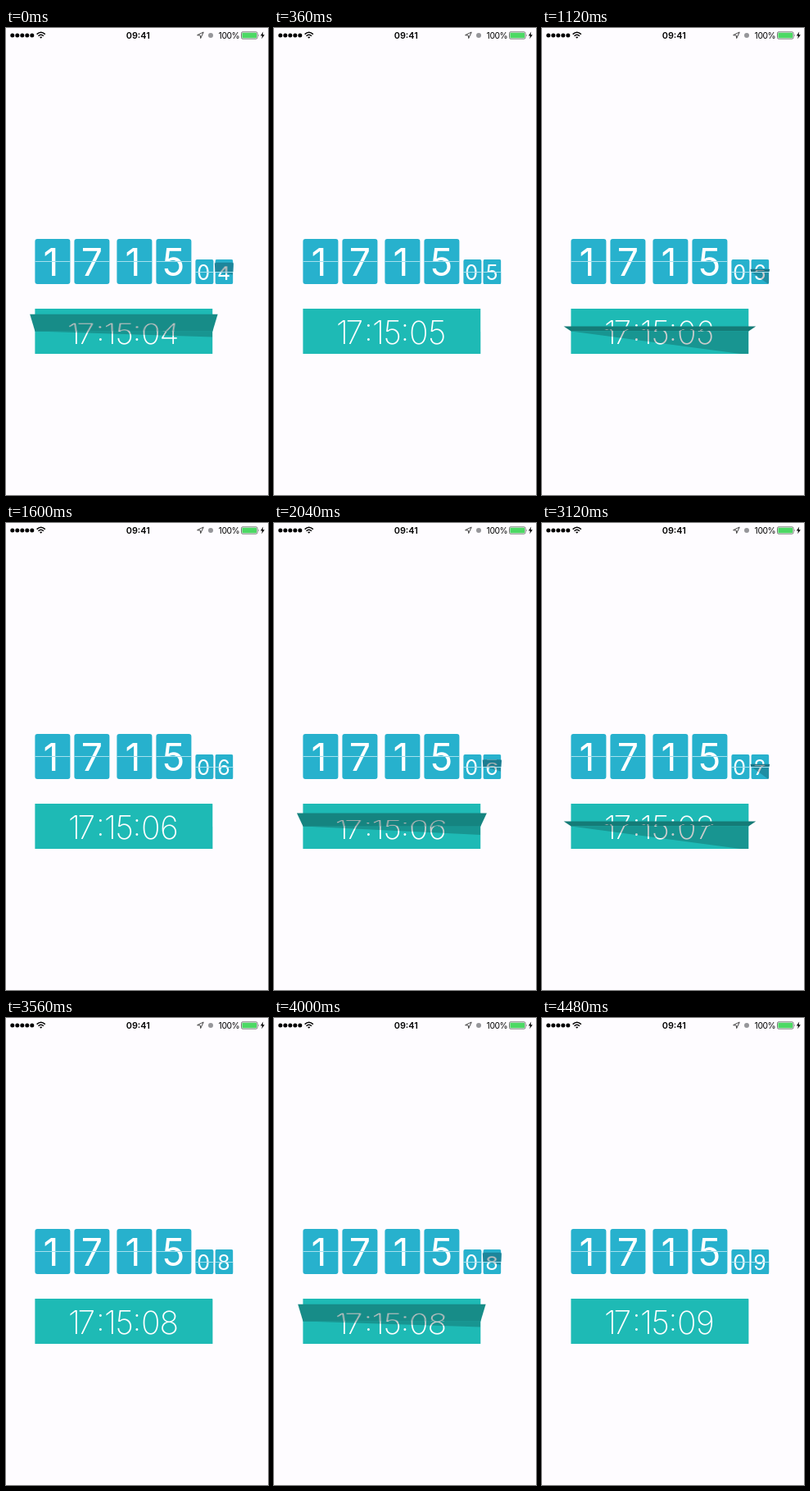
These frames come from a looping animation (320 px wide and 569 px high, 4600 ms). An HTML page:

```html
<!DOCTYPE html>
<html lang="en">
<head>
<meta charset="utf-8">
<title>Flip clock</title>
<style>
  html, body { margin: 0; width: 100%; height: 100%; overflow: hidden; background: #fefcff; }
  #stage { position: relative; width: 320px; height: 569px; overflow: hidden; font-family: Inter, Roboto, sans-serif; }
  svg { position: absolute; left: 0; top: 0; }
  .card { position: absolute; perspective: calc(var(--h) * 13); transform: translateX(.4px); --bg: #27b1cd; color: #fff; }
  .tile { width: 43px; height: 55px; top: 257px; --h: 27.5px; --r: 3px; --size: 46.5px; }
  .small { width: 22px; height: 30px; top: 282px; --h: 15px; --r: 2px; --size: 25px; }
  .panel { left: 35px; width: 217px; height: 55px; top: 342px; --h: 27.5px; --r: 0px; --size: 39px; --bg: #1ebab5; font-weight: 150; }
  .half { position: absolute; left: 0; width: 100%; height: var(--h); overflow: hidden; background: var(--bg); }
  .top { top: 0; border-radius: var(--r) var(--r) 0 0; transform-origin: 50% 100%; }
  .low { top: var(--h); border-radius: 0 0 var(--r) var(--r); transform-origin: 50% 0; }
  .face { position: absolute; left: 0; top: 0; width: 100%; height: calc(var(--h) * 2); line-height: calc(var(--h) * 2); font-size: var(--size); }
  .low .face { top: calc(var(--h) * -1); }
  .face span { position: absolute; top: .8px; width: 60px; margin-left: -30px; text-align: center; }
  .face .colon { top: -.08em; }
  .plain { background: var(--bg); border-radius: var(--r); }
  .shade { position: absolute; inset: 0; background: #000; opacity: 0; }
  .line { position: absolute; left: 0; width: 100%; height: 1px; top: calc(var(--h) - .5px); background: #a4e0ee; }
  .small .line { top: 15px; }
</style>
</head>
<body>
<div id="stage">
  <svg width="320" height="20" font-size="11">
    <g id="dots"></g>
    <g fill="none" stroke="#000" stroke-width="1.5">
      <path d="M37.6 7.6Q42.7 2.9 47.8 7.6M39.5 9.7Q42.7 6.8 45.9 9.7"/>
    </g>
    <path d="M41 11.1Q42.7 9.7 44.4 11.1L42.7 12.8Z"/>
    <text x="161.3" y="12.7" text-anchor="middle" font-size="10.8" font-weight="600">09:41</text>
    <path d="M233.6 8.7L241.2 5L237.7 12.6L237.3 9.1Z" fill="none" stroke="#444" stroke-width="1"/>
    <circle cx="250" cy="9" r="3" fill="#96969a"/>
    <text x="285.3" y="12.7" text-anchor="end" font-size="10.3" letter-spacing="-.4">100%</text>
    <rect x="287.5" y="4.8" width="19.5" height="8.4" rx="1.5" fill="#fff" stroke="#555" stroke-width=".8"/>
    <rect x="288.4" y="5.7" width="17.7" height="6.6" rx=".8" fill="#4cd964"/>
    <path d="M308 7.4Q309.3 9 308 10.6Z" fill="#555"/>
    <path d="M314.2 4.6L310.8 9.5H313L312.2 13.2L315.8 8.2H313.5Z"/>
  </svg>
</div>
<script>
const LOOP = 4600, FRAME = 40, LEAD = 125, FOLD = 170, END = 300;
const stage = document.getElementById('stage');

document.getElementById('dots').innerHTML =
  [0, 1, 2, 3, 4].map(i => `<circle cx="${7.8 + i * 6}" cy="9" r="2.5"/>`).join('');

function add(parent, cls, html = '') {
  const el = document.createElement('div');
  el.className = cls;
  el.innerHTML = html;
  parent.append(el);
  return el;
}

// Each character is centred on its own x position
function glyphs(text, xs) {
  return [...text].map((c, i) =>
    `<span class="${c === ':' ? 'colon' : ''}" style="left:${xs[i]}px">${c}</span>`).join('');
}

function staticTile(cls, left, digit, mid) {
  const card = add(stage, 'card ' + cls);
  card.style.left = left + 'px';
  add(card, 'face plain', glyphs(digit, [mid]));
  add(card, 'line');
}

function flipCard(cls, left, xs, label, hasLine) {
  const card = add(stage, 'card ' + cls);
  card.style.left = left + 'px';
  const half = side => {
    const el = add(card, 'half ' + side);
    return { el, face: add(el, 'face'), shade: add(el, 'shade') };
  };
  const top = half('top'), low = half('low'), front = half('top'), back = half('low');
  if (hasLine) add(card, 'line');
  const h = card.offsetHeight / 2;
  let shown = null;

  return (from, to, angle) => {
    if (shown !== to) {
      shown = to;
      top.face.innerHTML = back.face.innerHTML = glyphs(label(to), xs);
      low.face.innerHTML = front.face.innerHTML = glyphs(label(from), xs);
    }
    const rad = Math.PI / 180;
    front.el.style.visibility = angle < 90 ? 'visible' : 'hidden';
    back.el.style.visibility = angle >= 90 ? 'visible' : 'hidden';
    front.el.style.transform = `rotateX(${-Math.min(angle, 90)}deg)`;
    back.el.style.transform = angle < 180 ? `rotateX(${180 - Math.max(angle, 90)}deg)` : 'none';
    front.shade.style.opacity = 0.35 * Math.sin(angle * rad);
    back.shade.style.opacity = Math.max(0, 0.25 * (180 - angle) / 90);

    // Slanted shadow the falling flap casts on the lower half
    const drop = angle < 86 ? 0.273 * h * Math.tan(angle * 0.96 * rad) : 8 * h;
    low.shade.style.opacity = angle < 180 ? 0.2 : 0;
    low.shade.style.clipPath = `polygon(0 0, 100% 0, 100% ${drop}px)`;
  };
}

[[35, '1', 19.5], [83, '7', 21.5], [135, '1', 19.5], [183, '5', 21.2]]
  .forEach(([x, digit, mid]) => staticTile('tile', x, digit, mid));
staticTile('small', 230.5, '0', 10.3);

const cards = [
  flipCard('small', 255, [10.7], n => String(n), true),
  flipCard('panel', 35, [48, 63, 80, 92, 109.5, 124.5, 141.3, 164], n => '17:15:0' + n, false)
];

function flipAngle(p) {
  if (p >= END) return 180;
  if (p >= FOLD) return 90 + 90 * (p - FOLD) / (END - FOLD);
  const u = (p + LEAD) / (FOLD + LEAD);
  return 90 * u * (1.3 - 0.3 * u);
}

const start = performance.now();
function draw() {
  const t = Math.floor((performance.now() - start) % LOOP / FRAME) * FRAME;
  const k = Math.floor((t + LEAD) / 1000);
  const angle = flipAngle(t - k * 1000);
  cards.forEach(set => set(4 + k, 5 + k, angle));
  requestAnimationFrame(draw);
}
draw();
</script>
</body>
</html>
```
